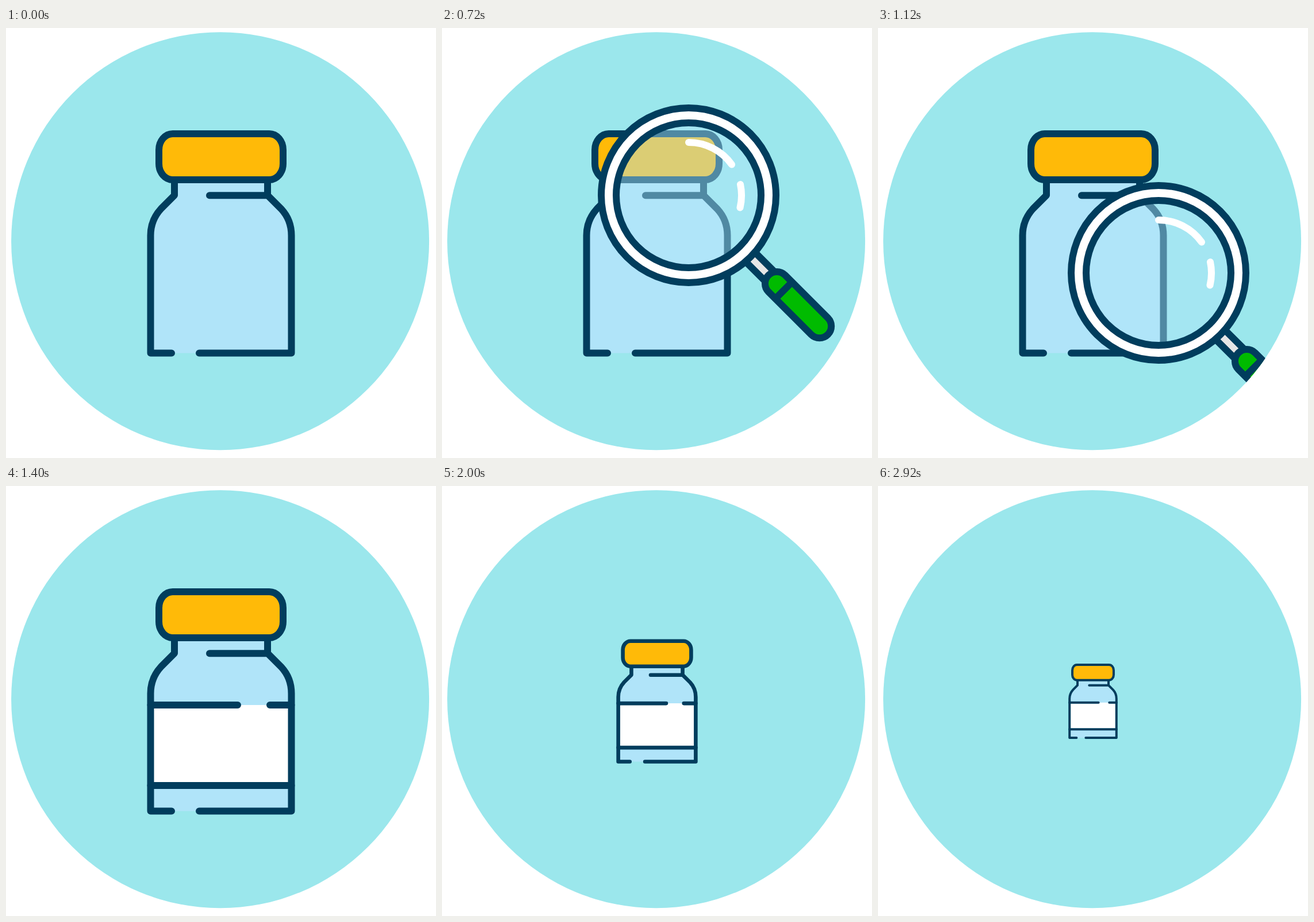
Write an HTML page that moves like this. It is 748x748 px and loops after 2960 ms.

```html
<!DOCTYPE html>
<html lang="en">
<head>
<meta charset="utf-8">
<title>Vial and magnifier</title>
<style>
  html, body { margin: 0; width: 100%; height: 100%; overflow: hidden; background: #fff; }
  svg { display: block; width: 100vw; height: 100vh; }
  .line { fill: none; stroke: #013d5d; stroke-width: 12; stroke-linecap: round; stroke-linejoin: round; }
  .shine { fill: none; stroke: #fff; stroke-width: 12; stroke-linecap: round; }
</style>
</head>
<body>
<svg viewBox="0 0 748 748">
  <clipPath id="porthole"><circle cx="372.6" cy="370.8" r="363.5"/></clipPath>
  <circle cx="372.6" cy="370.8" r="363.5" fill="#9be7ec"/>

  <g id="vial">
    <path fill="#b0e4f9" d="M293 264V291L270 314Q251.5 334 251.5 361V565.5H496.5V361Q496.5 334 479 315L455 291V264Z"/>
    <g id="label">
      <path fill="#fff" d="M251.5 381H496.5V521H251.5Z"/>
      <path class="line" d="M251.5 381H403M459 381H496.5M251.5 521H496.5"/>
    </g>
    <path class="line" d="M293 264V291L270 314Q251.5 334 251.5 361V565.5H288M336 565.5H496.5V361Q496.5 334 479 315L455 291V264M354 291.3H455"/>
    <rect class="line" x="266" y="184" width="216" height="80" rx="24" ry="28" style="fill:#ffba08"/>
  </g>

  <g clip-path="url(#porthole)">
    <g id="magnifier">
      <g transform="rotate(45)">
        <rect class="line" x="145" y="-11.5" width="60" height="23" style="fill:#e6e6e6"/>
        <rect class="line" x="196.5" y="-20.5" width="146" height="41" rx="20.5" style="fill:#00bb00"/>
        <path class="line" d="M234 -20V20"/>
      </g>
      <circle r="122" fill="#b0e4f9" fill-opacity=".45"/>
      <circle class="line" r="139" style="stroke-width:38"/>
      <circle class="shine" r="139" style="stroke-width:14"/>
      <path class="shine" d="M0 -92A92 92 0 0 1 75 -53.5M90 -19A92 92 0 0 1 89.5 21.5"/>
    </g>
  </g>
</svg>
<script>
  const LOOP = 2960, STEP = 40;
  const [vial, label, magnifier] = ["vial", "label", "magnifier"].map(id => document.getElementById(id));

  // Keys are [time, value...]
  const sweep = [[0, 960, 582], [400, 429, 503], [800, 429, 238], [1080, 429, 406.5], [1440, 960, 582]];
  const pulse = [[1800, 1], [1880, 1.105], [2000, .55], [2080, .33], [2320, .76], [2720, .76], [2800, .833], [2920, .333]];

  const linear = p => p;
  const smooth = p => (1 - Math.cos(Math.PI * p)) / 2;

  function sample(keys, time, ease) {
    const next = keys.findIndex(key => key[0] > time);
    if (next === 0) return keys[0].slice(1);
    if (next < 0) return keys[keys.length - 1].slice(1);
    const a = keys[next - 1], b = keys[next];
    const p = ease((time - a[0]) / (b[0] - a[0]));
    return a.slice(1).map((value, i) => value + (b[i + 1] - value) * p);
  }

  function draw(now) {
    const time = Math.floor(now % LOOP / STEP) * STEP;
    const [x, y] = sample(sweep, time, linear);
    const [scale] = sample(pulse, time, smooth);
    const [opacity] = sample([[1160, 0], [1400, 1]], time, linear);
    magnifier.setAttribute("transform", `translate(${x} ${y})`);
    vial.setAttribute("transform", `translate(374 374.5) scale(${scale}) translate(-374 -374.5)`);
    label.setAttribute("opacity", opacity);
  }

  const start = performance.now();
  function tick() {
    draw(performance.now() - start);
    requestAnimationFrame(tick);
  }
  tick();
</script>
</body>
</html>
```
